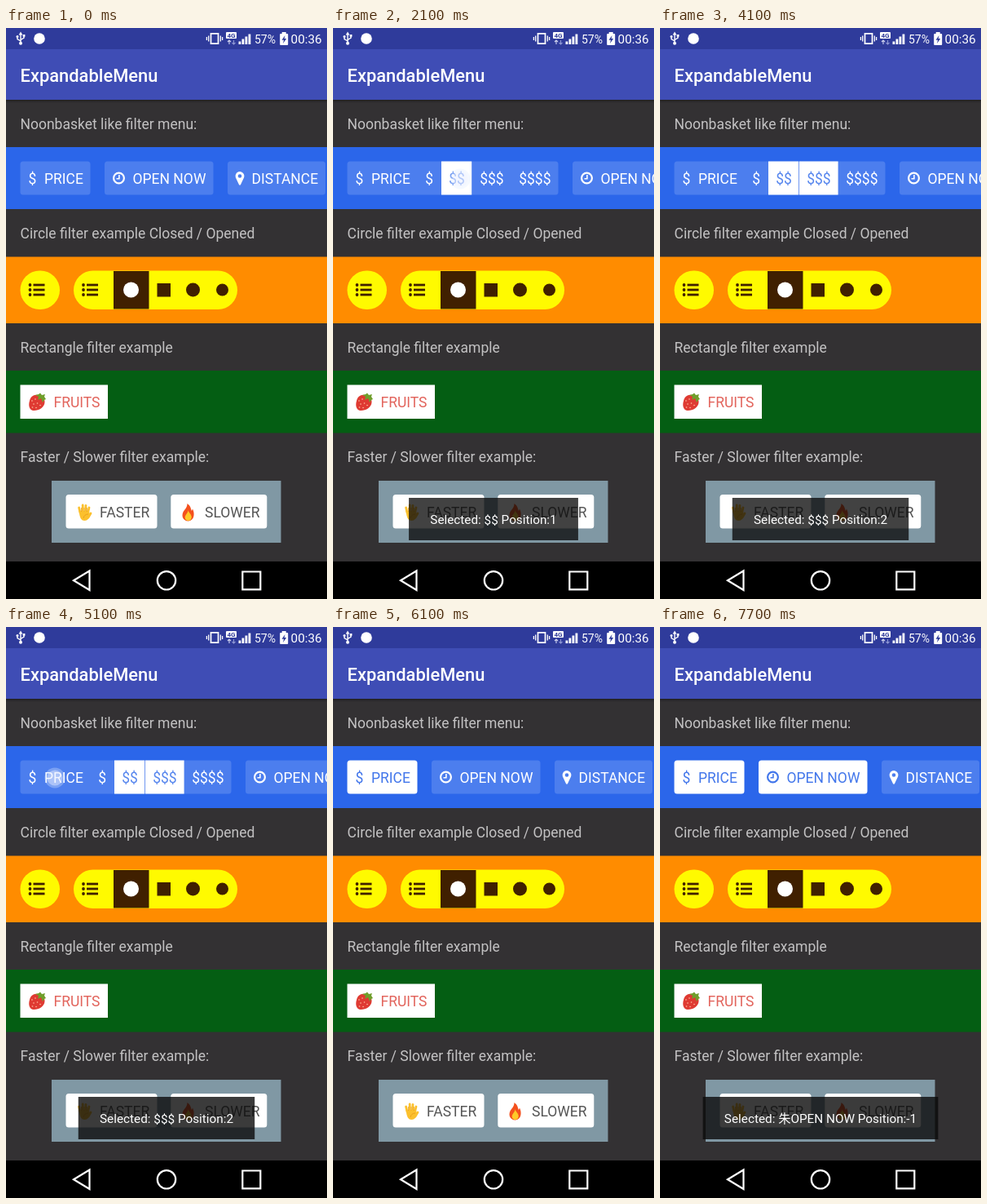
These frames come from a looping animation (394x700 px, 8000 ms). An HTML page with a canvas:

```html
<!DOCTYPE html>
<html lang="en">
<head>
<meta charset="utf-8">
<title>ExpandableMenu</title>
<style>
  html, body { margin: 0; width: 100%; height: 100%; overflow: hidden; background: #333133; }
  canvas { display: block; width: 394px; height: 700px; }
</style>
</head>
<body>
<canvas id="stage" width="394" height="700"></canvas>
<script>
const ctx = document.getElementById('stage').getContext('2d');
const LOOP = 8000;
const FONT = 'Roboto, "Noto Sans CJK JP", "Noto Sans CJK SC", sans-serif';
const WHITE = '#fff', BLUE = '#2b66ea', PILL = '#4c7eee', BROWN = '#402000', YELLOW = '#fffa00';
const MENU_GROWTH = 173;

// Timeline, in ms
const expansion = [[0, 0], [700, 0.55], [900, 1], [5300, 0.45], [5500, 0]];
const toasts = [
  { from: 2100, to: 4100, text: 'Selected: $$ Position:1' },
  { from: 4100, to: 6100, text: 'Selected: $$$ Position:2' },
  { from: 7500, to: 8000, text: 'Selected: 朱OPEN NOW Position:-1' }
];
const touches = [
  { from: 500, to: 700, x: 60 },
  { from: 1900, to: 2300, x: 156 },
  { from: 2300, to: 2700, x: 194 },
  { from: 5100, to: 5300, x: 60 },
  { from: 7100, to: 7700, x: 194 }
];

const stepAt = (list, t) => list.filter(k => k[0] <= t).pop()[1];
const active = (list, t) => list.find(e => t >= e.from && t < e.to);

function rect(x, y, w, h, color, r = 0) {
  ctx.fillStyle = color;
  ctx.beginPath();
  ctx.roundRect(x, y, w, h, r);
  ctx.fill();
}

function disc(x, y, r, color) {
  ctx.fillStyle = color;
  ctx.beginPath();
  ctx.arc(x, y, r, 0, Math.PI * 2);
  ctx.fill();
}

function ring(x, y, r, color, width) {
  ctx.strokeStyle = color;
  ctx.lineWidth = width;
  ctx.beginPath();
  ctx.arc(x, y, r, 0, Math.PI * 2);
  ctx.stroke();
}

function line(d, color, width) {
  ctx.strokeStyle = color;
  ctx.lineWidth = width;
  ctx.stroke(new Path2D(d));
}

function shape(d, color) {
  ctx.fillStyle = color;
  ctx.fill(new Path2D(d));
}

function text(s, x, y, color, size = 17.5, weight = 400, align = 'left') {
  ctx.font = `${weight} ${size}px ${FONT}`;
  ctx.textAlign = align;
  ctx.fillStyle = color;
  ctx.fillText(s, x, y);
}

function statusBar() {
  rect(0, 0, 394, 26, '#2f3b9b');
  // USB
  line('M18 7V18M18 16L14 13.5V11M18 14.5L22 12V9.5', WHITE, 1.4);
  shape('M18 4.5L20.4 8.5H15.6Z', WHITE);
  disc(18, 18.7, 2, WHITE);
  disc(14, 10.5, 1.5, WHITE);
  rect(20.6, 8, 2.8, 2.8, WHITE);
  disc(41, 13, 6.8, WHITE);
  // Vibrate
  line('M251.5 6.8H260.5V19.2H251.5Z', WHITE, 1.7);
  line('M248.7 9.5V16.5M246.4 11V15M263.3 9.5V16.5M265.6 11V15', WHITE, 1.3);
  // Mobile data
  rect(270, 5, 13, 8, WHITE, 1);
  text('4G', 276.5, 12, '#2f3b9b', 8, 700, 'center');
  line('M274 20V15M272 17L274 15L276 17', '#cfd3ee', 1.1);
  line('M279.5 15V20M277.5 18L279.5 20L281.5 18', '#8f99d4', 1.1);
  for (let i = 0; i < 4; i++) rect(285.5 + i * 4, 16.5 - i * 3, 2.8, 3.5 + i * 3, WHITE);
  text('57%', 305, 18.7, WHITE, 14);
  // Battery
  rect(338.7, 5, 5, 3, WHITE);
  rect(336.2, 7, 10, 14, WHITE, 1);
  shape('M342.5 9L338.5 14.8H341L340 19L344.2 13H341.6Z', '#2f3b9b');
  text('00:36', 349.6, 19, WHITE, 15.3);
}

function appBar() {
  rect(0, 26, 394, 62, '#3f4db5');
  const shade = ctx.createLinearGradient(0, 88, 0, 92);
  shade.addColorStop(0, 'rgba(0,0,0,.35)');
  shade.addColorStop(1, 'rgba(0,0,0,0)');
  rect(0, 88, 394, 4, shade);
  text('ExpandableMenu', 17.5, 65.5, WHITE, 21.9, 500);
}

function clockIcon(x, y, color) {
  ring(x, y, 6.4, color, 2.2);
  line(`M${x + 0.4} ${y - 4}V${y + 0.8}H${x - 3}`, color, 1.6);
}

function pinIcon(x, y, color) {
  ctx.fillStyle = color;
  ctx.beginPath();
  ctx.arc(x, y - 3, 5.4, Math.PI * 0.9, Math.PI * 2.1);
  ctx.lineTo(x + 0.8, y + 8);
  ctx.lineTo(x - 0.8, y + 8);
  ctx.closePath();
  ctx.arc(x, y - 3, 2.3, 0, Math.PI * 2);
  ctx.fill('evenodd');
}

function filterPill(x, w, label, icon, selected) {
  const ink = selected ? '#4377eb' : WHITE;
  rect(x, 163.5, w, 41, selected ? WHITE : PILL, 3.5);
  icon(x, ink);
  return ink;
}

function priceMenu(t, p) {
  const closedAfterPick = t >= 5500;
  const ink = closedAfterPick ? '#4377eb' : WHITE;
  ctx.save();
  ctx.beginPath();
  ctx.roundRect(17.5, 163.5, 86 + MENU_GROWTH * p, 41, 3.5);
  ctx.clip();
  rect(17, 163, 261, 42, closedAfterPick ? WHITE : PILL);
  text('$', 27.5, 191, ink);
  text('PRICE', 47, 191, ink);
  if (p > 0) {
    const cells = [[104, 29], [133, 37.2], [171, 47.6], [219, 58]];
    cells.forEach(([x, w], i) => {
      const picked = (i === 1 && t >= 2100) || (i === 2 && t >= 2500);
      if (picked) rect(x, 163, w, 42, WHITE);
      text('$'.repeat(i + 1), x + 9.2, 191, picked ? '#5686ee' : WHITE);
    });
  }
  ctx.restore();
}

function filterRow(t) {
  const p = stepAt(expansion, t), shift = MENU_GROWTH * p;
  rect(0, 146, 394, 76, BLUE);
  priceMenu(t, p);
  const openInk = filterPill(121 + shift, 133.5, 'OPEN NOW',
    (x, ink) => clockIcon(x + 17.5, 184, ink), t >= 7500);
  text('OPEN NOW', 155.5 + shift, 191, openInk);
  const distInk = filterPill(272 + shift, 120, 'DISTANCE',
    (x, ink) => pinIcon(x + 15, 184.5, ink), false);
  text('DISTANCE', 301.5 + shift, 191, distInk);
}

function listIcon(x) {
  for (let i = 0; i < 3; i++) {
    const y = 315 + i * 6;
    disc(x + 2, y, 1.9, BROWN);
    rect(x + 6, y - 1.4, 14, 2.8, BROWN);
  }
}

function circleRow() {
  rect(0, 280.5, 394, 81.5, '#ff8c00');
  rect(17.5, 297.5, 48.5, 47.5, YELLOW, 23.7);
  rect(83, 297.5, 201, 47.5, YELLOW, 23.7);
  listIcon(27.5);
  listIcon(93);
  rect(132, 298, 43.5, 46.5, BROWN);
  disc(153.5, 321, 9.5, WHITE);
  rect(185.5, 313, 16.5, 16.5, BROWN);
  disc(229.5, 321, 8.5, BROWN);
  disc(265.5, 321, 7.5, BROWN);
}

function strawberry() {
  shape('M29 457C27 463 29 469 34 469C41 469 47 465 47.5 459C48 454 44 450 39 450C34 449 30 452 29 457Z', '#df3a32');
  shape('M36 450L40 452L39 456L43 454L45 459L47 456L49 455L47 452L48 449L44 450L42 447.5L40 449Z', '#6f9f2c');
  for (const [x, y] of [[32, 457], [36, 455], [34, 461], [38.5, 460], [32.5, 465], [37, 465.5], [42, 462.5]])
    disc(x, y, 0.8, '#ffc2a0');
}

function hand() {
  ctx.lineCap = 'round';
  line('M91 594L89.6 588M94.2 593V585M97.6 593L98 585.3M100.6 594L102 588M101 600L104 595', '#fbc02d', 2.8);
  ctx.lineCap = 'butt';
  shape('M89.5 592H102L103 597C102.5 601 100 604 96.5 604C92.5 604 90.5 601 89.5 592Z', '#fbc02d');
  line('M92.6 593V588M96 592.5V588M99.3 593V588M95 601Q96 596 101 596', '#e89a1c', 0.8);
}

function flame() {
  shape('M222.5 583C227 586 226.5 589 228 592L229 589.5C231.5 594 232 603.5 224 604.5C216 604.5 214.5 596 219 591C221.5 588 222.5 586 222.5 583Z', '#f4511e');
  shape('M223.5 591C224 594.5 228 596 227.7 600C227.3 603 225.5 604 223.5 604C219.5 603.5 218.7 599.5 221 596.5C222.7 594.5 223.3 593 223.5 591Z', '#ffc928');
}

function lowerRows() {
  rect(0, 420, 394, 76.5, '#045e13');
  rect(17.5, 437.5, 107.5, 41.5, WHITE);
  strawberry();
  text('FRUITS', 58.5, 465, '#e2645c');

  rect(56, 555, 281.5, 76, '#8098a4');
  rect(73.5, 572, 112, 41.5, WHITE, 3.5);
  rect(202.3, 572, 118, 41.5, WHITE, 3.5);
  hand();
  flame();
  text('FASTER', 115, 599.5, '#555');
  text('SLOWER', 244, 599.5, '#555');
}

function labels() {
  const rows = [
    ['Noonbasket like filter menu:', 124],
    ['Circle filter example Closed / Opened', 258],
    ['Rectangle filter example', 398],
    ['Faster / Slower filter example:', 532]
  ];
  rows.forEach(([s, y]) => text(s, 17.5, y, '#c3c2c3'));
}

function toast(t) {
  const item = active(toasts, t);
  if (!item) return;
  ctx.font = `400 15.3px ${FONT}`;
  const w = ctx.measureText(item.text).width + 52.5;
  rect(197 - w / 2, 576, w, 52, `rgba(10,10,10,${t - item.from < 200 ? 0.77 : 0.8})`);
  text(item.text, 197, 608.3, WHITE, 15.3, 400, 'center');
}

function touch(t) {
  const dot = active(touches, t);
  if (!dot) return;
  disc(dot.x, 185, 12.5, 'rgba(225,235,255,.32)');
  disc(dot.x, 185, 9.5, 'rgba(240,244,255,.42)');
}

function navBar() {
  rect(0, 654, 394, 46, '#000');
  line('M102.5 665.5V689L83 677.2Z', WHITE, 2.2);
  ring(197, 677.3, 11.2, WHITE, 2.2);
  line('M290.3 666.5H312.3V688.3H290.3Z', WHITE, 2.2);
}

function draw(t) {
  rect(0, 0, 394, 700, '#333133');
  statusBar();
  appBar();
  labels();
  filterRow(t);
  circleRow();
  lowerRows();
  toast(t);
  navBar();
  touch(t);
}

const start = performance.now();
function tick() {
  draw((performance.now() - start) % LOOP);
  requestAnimationFrame(tick);
}
tick();
</script>
</body>
</html>
```
